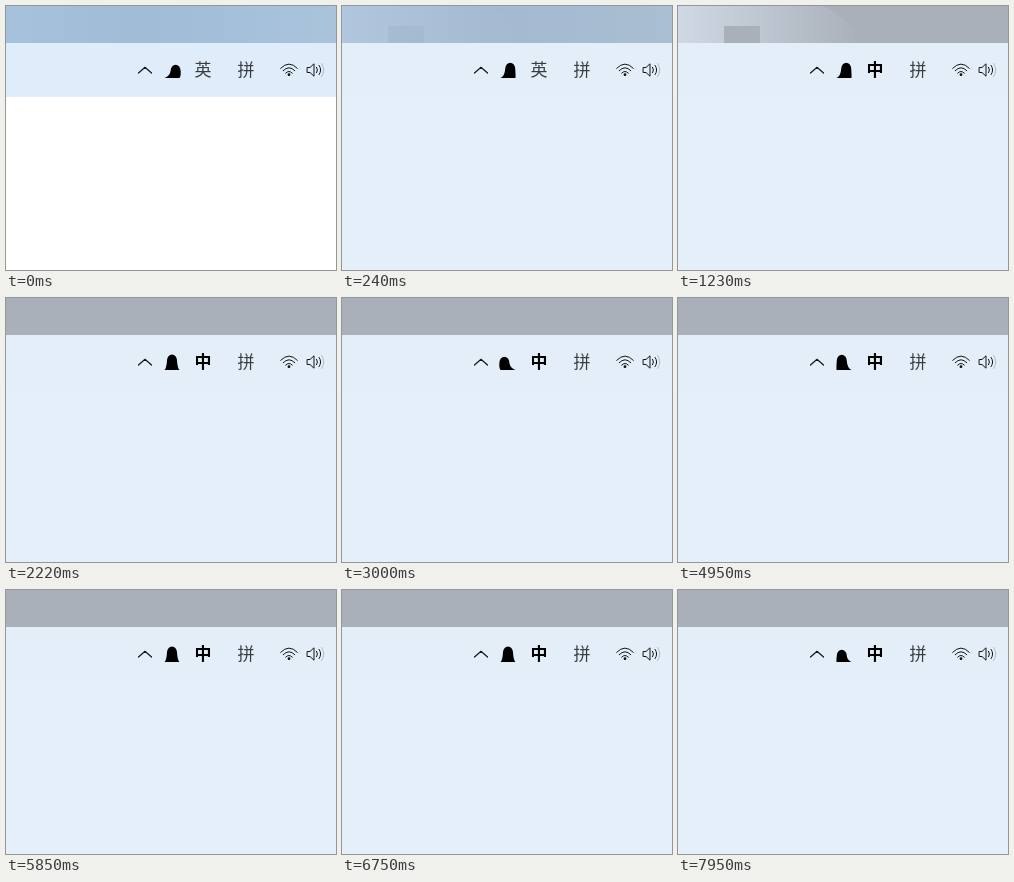
An HTML page for the animation above (8000 ms loop, 330 by 264 pixels).

```html
<!DOCTYPE html>
<html lang="zh">
<head>
<meta charset="utf-8">
<style>
  html, body { margin: 0; width: 100%; height: 100%; overflow: hidden; background: #fff; }
  svg { display: block; width: 330px; height: 264px; }
  text { font: 300 17px "Noto Sans CJK SC", "Noto Sans CJK", sans-serif; text-anchor: middle; fill: #3a3d40; }
  .line { fill: none; stroke: #151515; stroke-linecap: round; stroke-linejoin: round; }
  #mode.zh { font-weight: 700; fill: #000; }
</style>
</head>
<body>
<svg viewBox="0 0 330 264">
  <defs>
    <linearGradient id="sky">
      <stop offset="0" stop-color="#a6c1dc"/>
      <stop offset=".4" stop-color="#a0bcd7"/>
      <stop offset="1" stop-color="#a9c3db"/>
    </linearGradient>
    <linearGradient id="haze">
      <stop offset="0" stop-color="#d0d8e5"/>
      <stop offset=".5" stop-color="#bcc4cf"/>
      <stop offset="1" stop-color="#a9b0ba"/>
    </linearGradient>
  </defs>
  <rect id="page" y="91" width="330" height="173"/>
  <rect width="330" height="37" fill="#a9b0ba"/>
  <path id="glow" d="M0 0H145Q172 12 183 37H82V20H46V37H0Z" fill="url(#haze)"/>
  <rect id="top" width="330" height="37" fill="url(#sky)"/>
  <rect id="bar" y="37" width="330" height="54"/>

  <path class="line" stroke-width="1.2" d="M132.5 67 139 61.3 145.5 67"/>
  <path id="pet" fill="#000"/>
  <text id="mode" x="197" y="70.2"></text>
  <text x="240" y="70.2">拼</text>

  <g id="wifi" class="line"></g>
  <circle cx="283" cy="68.7" r="1.4" fill="#111"/>
  <g id="sound" class="line">
    <path d="M301.5 61.5H304L308 57.8V70.2L304 66.5H301.5Z"/>
  </g>
</svg>
<script>
const LOOP = 8000;
const $ = id => document.getElementById(id);

// [from, ms per step]: the pet slows, then runs faster and faster
const pace = [[0, 100], [1200, 150], [1800, 60], [4260, 40], [5070, 30], [7440, 45]];

function stepAt(t) {
  return Math.floor(pace.reduce((n, [from, ms], i) => {
    const end = i + 1 < pace.length ? pace[i + 1][0] : LOOP;
    return n + Math.max(0, Math.min(t, end) - from) / ms;
  }, 0) + 1e-6);
}

// the head circles once in ten steps over a fixed base
function blob(n) {
  const a = (n - 0.5) * Math.PI / 5;
  const x = 166 + 3.8 * Math.cos(a), y = 64.2 - 1.8 * Math.sin(a);
  return `M158.5 72Q${x - 5.5} 70 ${x - 5} ${y}` +
    `A5 6 0 0 1 ${x + 5} ${y}Q${x + 5.5} 70 173.5 72Z`;
}

function arcs() {
  for (let i = 0; i < 3; i++) {
    const w = 3.3 + 2.5 * i, y = 67.1 - 2.4 * i;
    $('wifi').innerHTML += `<path d="M${283 - w} ${y}q${w} ${-w * 1.04} ${2 * w} 0"/>`;
    const h = 2.7 + 1.9 * i, x = 310.6 + 2.5 * i, tone = i < 2 ? '#151515' : '#b4bbc3';
    $('sound').innerHTML += `<path d="M${x} ${64 - h}q${h * .7} ${h} 0 ${2 * h}" stroke="${tone}"/>`;
  }
}

function draw(t) {
  const n = stepAt(t), zh = n >= 5;
  $('pet').setAttribute('d', blob(n));
  $('page').setAttribute('fill', t < 60 ? '#fff' : '#e4effa');
  $('bar').setAttribute('fill', t < 60 ? '#dfecf9' : '#e3eef8');
  $('top').setAttribute('opacity', Math.max(0, 1 - n / 8));
  $('glow').setAttribute('opacity', Math.max(0, Math.min(1, (15 - n) / 3)));
  $('mode').textContent = zh ? '中' : '英';
  $('mode').classList.toggle('zh', zh);
}

arcs();
const start = performance.now();
function tick() {
  draw((performance.now() - start) % LOOP);
  requestAnimationFrame(tick);
}
tick();
</script>
</body>
</html>
```
